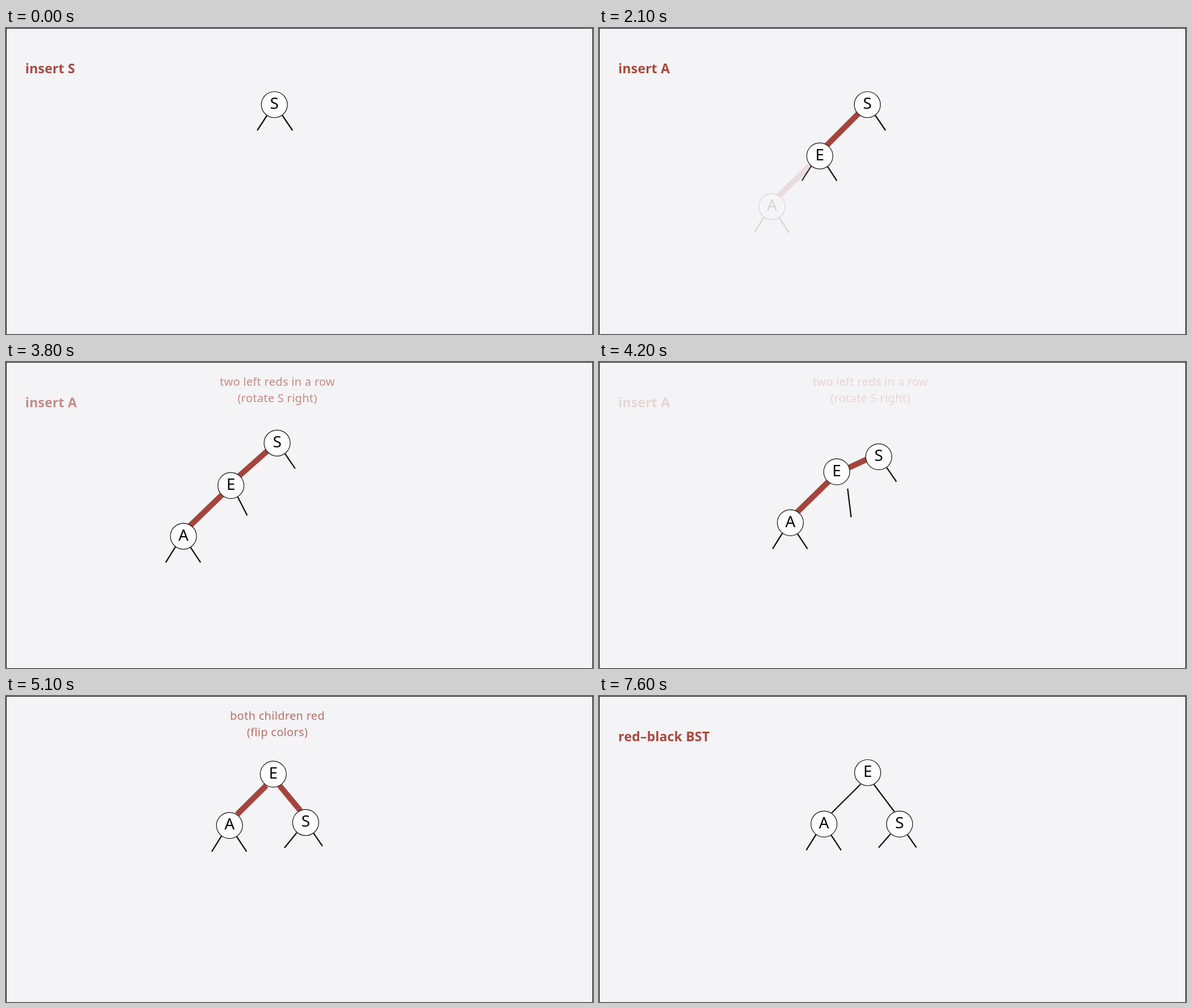
Animation of 1035x541 px, one loop 8 s. Source, as an HTML page:

```html
<!DOCTYPE html>
<html lang="en">
<head>
<meta charset="utf-8">
<title>Red-black tree insertion</title>
<style>
  html, body { margin: 0; width: 100%; height: 100%; overflow: hidden; background: #f4f3f5; }
  svg { display: block; width: 1035px; height: 541px; }
  text { font-family: "Noto Sans", "Open Sans", sans-serif; }
  .title { font-size: 23px; font-weight: 700; letter-spacing: .2px; fill: #a7493f; }
  .note { font-size: 20px; letter-spacing: .3px; fill: #a7493f; text-anchor: middle; }
  .node text { font-size: 28px; text-anchor: middle; fill: #080808; }
  .node circle { fill: #fefdfe; stroke: #111; stroke-width: 1.2; }
  .link { stroke: #111; stroke-width: 2.3; }
  .red { stroke: #a4453c; stroke-width: 10; }
</style>
</head>
<body>
<svg viewBox="0 0 1035 541">
  <rect width="1035" height="541" fill="#f4f3f5"/>
  <path d="M.5 541V.5H1034.5V541" fill="none" stroke="#000"/>
  <text id="title" class="title" x="34" y="79.5"></text>
  <g id="rotateNote" class="note">
    <text x="478.5" y="42">two left reds in a row</text>
    <text x="478.5" y="70.5">(rotate S right)</text>
  </g>
  <g id="flipNote" class="note">
    <text x="478.5" y="42">both children red</text>
    <text x="478.5" y="70.5">(flip colors)</text>
  </g>
  <line id="sLeft" class="link"/>
  <line id="eLeft" class="link"/>
  <g id="groupA">
    <line id="redA" class="red"/>
    <line id="blackA" class="link"/>
    <line id="aLeft" class="link"/>
    <line id="aRight" class="link"/>
    <g id="nodeA" class="node"><circle r="23"/><text y="7.5">A</text></g>
  </g>
  <g id="groupE">
    <line id="redS" class="red"/>
    <line id="blackS" class="link"/>
    <line id="middle" class="link"/>
    <g id="nodeE" class="node"><circle r="23"/><text y="7.5">E</text></g>
  </g>
  <line id="sRight" class="link"/>
  <g id="nodeS" class="node"><circle r="23"/><text y="7.5">S</text></g>
</svg>
<script>
const LOOP = 8000, STEP = 100;
const $ = id => document.getElementById(id);
const ramp = (t, from, to) => Math.min(1, Math.max(0, (t - from) / (to - from)));
const ease = u => (1 - Math.cos(Math.PI * u)) / 2;
const mix = (a, b, p) => a + (b - a) * p;
const mixPt = (a, b, p) => [mix(a[0], b[0], p), mix(a[1], b[1], p)];
const add = (a, b) => [a[0] + b[0], a[1] + b[1]];
const fade = (id, v) => $(id).setAttribute('opacity', v);

function line(id, a, b) {
  const el = $(id);
  el.setAttribute('x1', a[0]);
  el.setAttribute('y1', a[1]);
  el.setAttribute('x2', b[0]);
  el.setAttribute('y2', b[1]);
}

function node(id, c) {
  $(id).setAttribute('transform', `translate(${c[0]} ${c[1]})`);
}

// The free link between E and S swings across and stretches on the way.
function swingLink(p) {
  const bump = p * (1 - p);
  const x = mix(411.2, 503.5, p) + 35 * bump * (2 * p - 1);
  const y = mix(257.5, 256, p) - 34 * bump;
  const angle = mix(56.6, 131.2, p) * Math.PI / 180;
  const half = mix(30, 32, p) / 2 + 44 * bump;
  const dx = half * Math.cos(angle), dy = half * Math.sin(angle);
  line('middle', [x - dx, y - dy], [x + dx, y + dy]);
}

function draw(t) {
  const addE = ramp(t, 500, 1450);
  const addA = ramp(t, 2000, 2800);
  const p = ease(ramp(t, 3450, 5300));
  const flip = ramp(t, 5700, 6600);
  const leave = ramp(t, 3450, 4350);

  const S = mixPt([473.2, 135.5], [530, 226.3], p);
  const E = mixPt([389.3, 226.2], [473.7, 135.5], p);
  const A = mixPt([305, 315.7], [396.7, 226.3], p);
  node('nodeS', S);
  node('nodeE', E);
  node('nodeA', A);

  line('sLeft', [460, 155], [443, 181]);
  line('sRight', add(S, [14, 19]), add(S, mixPt([32, 45.5], [29.5, 41.5], p)));
  line('eLeft', [374.3, 244], [357.7, 270]);
  line('aLeft', add(A, [-14, 18.5]), add(A, [-31.3, 46.3]));
  line('aRight', add(A, [12.5, 19.5]), add(A, [30.2, 46.3]));
  swingLink(p);

  const aTop = add(E, mixPt([-14, 14], [-12.5, 20.5], p));
  const aEnd = add(A, mixPt([11, -18], [13.5, -19.5], p));
  const sTop = add(S, mixPt([-11, 11], [-9, -21.5], p));
  const sEnd = add(E, mixPt([7, -13.5], [11, 21], p));
  for (const id of ['redA', 'blackA']) line(id, aTop, aEnd);
  for (const id of ['redS', 'blackS']) line(id, sTop, sEnd);
  for (const id of ['redA', 'redS']) fade(id, 1 - flip);
  for (const id of ['blackA', 'blackS']) fade(id, flip);

  fade('groupE', addE);
  fade('groupA', addA);
  fade('sLeft', 1 - addE);
  fade('eLeft', addE * (1 - addA));

  $('title').textContent = t < 300 ? 'insert S' : t < 1700 ? 'insert E'
    : t < 5000 ? 'insert A' : 'red–black BST';
  fade('title', t < 5000 ? 1 - leave : ramp(t, 7000, 7600));
  fade('rotateNote', ramp(t, 3100, 3300) * (1 - leave));
  fade('flipNote', ramp(t, 4600, 5250) * (1 - flip));
}

const start = performance.now();
function tick() {
  const t = (performance.now() - start) % LOOP;
  draw(Math.floor(t / STEP) * STEP);
  requestAnimationFrame(tick);
}
tick();
</script>
</body>
</html>
```
